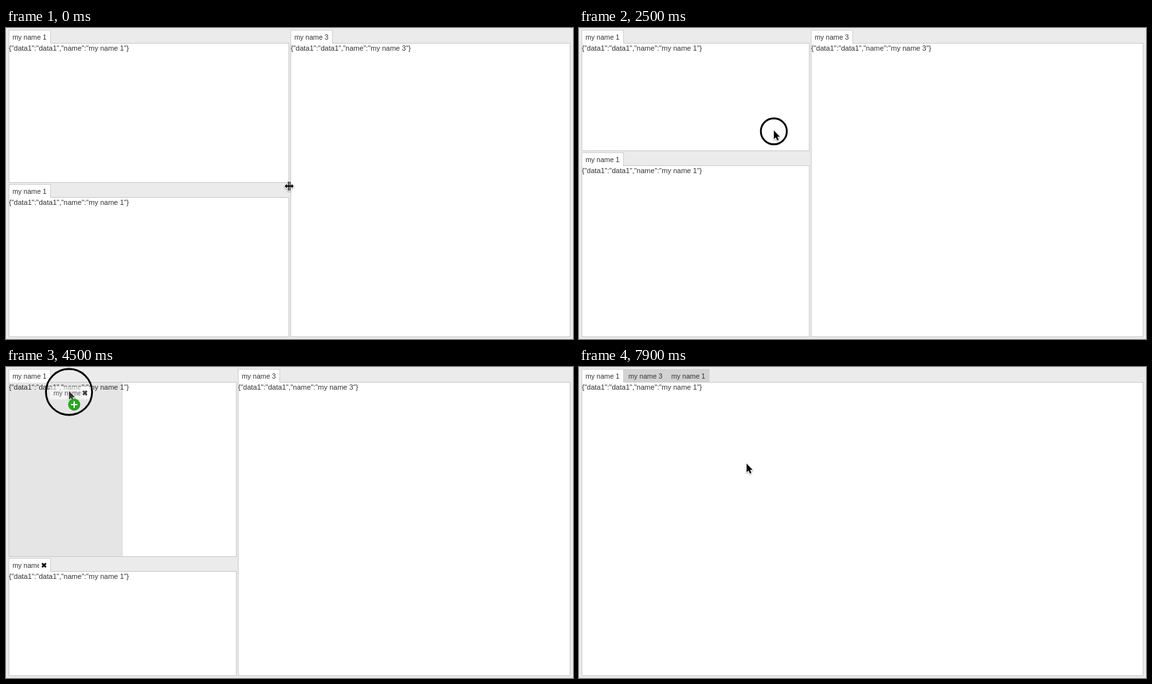
Animation of 873x480 px, one loop 8000 ms. Source, as an HTML page with a canvas:

```html
<!DOCTYPE html>
<html lang="en">
<head>
<meta charset="utf-8">
<title>Dockable panels</title>
<style>
html, body { margin: 0; width: 100%; height: 100%; overflow: hidden; background: #ebebeb; }
canvas { display: block; }
</style>
</head>
<body>
<canvas id="stage" width="873" height="480"></canvas>
<script>
const ctx = document.getElementById('stage').getContext('2d');
const LOOP = 8000, STEP = 100, LAG = 160;
const FONT = '"Liberation Sans", Arial, sans-serif';
const LEFT = 4, RIGHT = 868, TOP = 3, BOTTOM = 476, MIDDLE = 435;
const TAB = 66, HEAD = 20, GAP = 3;

// Pointer moves: start, end, x, y. It rests in between.
const moves = [
  [200, 1000, 557, 247], [1000, 1306, 355, 248],
  [1700, 2000, 300, 240], [2100, 2600, 300, 137], [2650, 3250, 300, 294],
  [3500, 3800, 36, 310], [4200, 4500, 97, 37], [4600, 4800, 97, 14],
  [5500, 5900, 300, 88], [5900, 6300, 476, 9],
  [6500, 7000, 97, 14], [7300, 7900, 258, 149]
];
const drags = [
  { from: 200, to: 1400 }, { from: 2100, to: 3450 },
  { from: 4180, to: 5000, tab: 1 }, { from: 6500, to: 7050, tab: 3 }
];

function pointerAt(t) {
  let x = 436, y = 244;
  for (const [start, end, toX, toY] of moves) {
    const k = Math.max(0, Math.min(1, (t - start) / (end - start)));
    x += (toX - x) * k;
    y += (toY - y) * k;
  }
  return { x: Math.round(x), y: Math.round(y) };
}

function text(s, x, y, size) {
  ctx.font = `${size}px ${FONT}`;
  ctx.fillStyle = '#333';
  ctx.fillText(s, x, y);
}

function rect(x, y, w, h, fill) {
  ctx.fillStyle = fill;
  ctx.fillRect(x, y, w, h);
}

function box(l, t, r, b, line) {
  rect(l, t, r - l + 1, b - t + 1, '#fff');
  ctx.strokeStyle = line;
  ctx.lineWidth = 1;
  ctx.strokeRect(l + .5, t + .5, r - l, b - t);
}

function label(n, x, y, hover, fill) {
  text('my name ' + n, x + 6, y + 14.5, 10.6);
  if (!hover) return;
  rect(x + 47, y + 2, 16, 17, fill);
  ctx.strokeStyle = '#111';
  ctx.lineWidth = 2.7;
  ctx.beginPath();
  ctx.moveTo(x + 51.5, y + 8); ctx.lineTo(x + 57.5, y + 14);
  ctx.moveTo(x + 57.5, y + 8); ctx.lineTo(x + 51.5, y + 14);
  ctx.stroke();
}

function panel(l, t, r, b, names, focus) {
  box(l, t + HEAD, r, b, '#c9c9c9');
  names.forEach((n, i) => {
    const x = l + TAB * i, fill = i ? '#d3d3d3' : '#fff';
    if (i) rect(x - 1, t, TAB, HEAD, fill);
    else {
      box(x, t, x + 64, t + HEAD, '#d0d0d0');
      rect(x + 1, t + HEAD - 1, 63, 3, fill);
    }
    const hover = focus.x >= x && focus.x < x + TAB && focus.y >= t && focus.y < t + HEAD;
    label(n, x, t, hover, fill);
  });
  text(`{"data1":"data1","name":"my name ${names[0]}"}`, l + .5, t + 31.5, 11);
}

function ghost(n, x, y) {
  rect(x - 30, y - 7, 65, 20, 'rgba(255,255,255,.6)');
  ctx.globalAlpha = .8;
  label(n, x - 30, y - 8, true, 'rgba(255,255,255,.6)');
  ctx.globalAlpha = 1;
}

function badge(x, y) {
  ctx.fillStyle = '#2aa522';
  ctx.beginPath();
  ctx.arc(x, y, 9.3, 0, 7);
  ctx.fill();
  rect(x - 5, y - 1, 10, 2, '#fff');
  rect(x - 1, y - 5, 2, 10, '#fff');
}

const arrow = new Path2D('M0 0V13.5L3 10.7L5.2 15.5L7.5 14.5L5.3 9.8H9.3Z');
const resize = new Path2D('M-7 0L-3.5-3.5V-1H-2V-7H-.6V-1H.6V-7H2V-1H3.5V-3.5L7 0L3.5 3.5V1H2V7H.6V1H-.6V7H-2V1H-3.5V3.5Z');

function cursor(x, y, shape) {
  const path = shape === 'arrow' ? arrow : resize;
  ctx.save();
  ctx.translate(x, y);
  if (shape === 'row') ctx.rotate(Math.PI / 2);
  ctx.lineJoin = 'round';
  ctx.strokeStyle = '#fff';
  ctx.lineWidth = 2;
  ctx.shadowColor = 'rgba(0,0,0,.35)';
  ctx.shadowBlur = 2;
  ctx.shadowOffsetY = 1;
  ctx.stroke(path);
  ctx.shadowColor = 'transparent';
  ctx.fillStyle = '#000';
  ctx.fill(path);
  ctx.restore();
}

function ring(x, y, r) {
  ctx.strokeStyle = '#000';
  ctx.lineWidth = 2.8;
  ctx.beginPath();
  ctx.arc(x, y, r, 0, 7);
  ctx.stroke();
}

function draw(t) {
  const { x, y } = pointerAt(t);
  const drag = drags.find(d => t >= d.from && t < d.to);
  const focus = drag ? pointerAt(drag.from) : { x, y };
  const [, rowDrag, tabDrop, lastDrop] = drags;
  let split = MIDDLE, shape = 'arrow';
  rect(0, 0, 873, 480, '#ebebeb');

  if (t < tabDrop.to) {
    split = Math.max(354, x - 1);
    // The lower splitter trails the pointer slightly.
    const row = t < rowDrag.from ? 238 : pointerAt(Math.min(t, rowDrag.to) - LAG).y - 2;
    panel(LEFT, TOP, t < 1700 ? split : split = 354, row, [1], focus);
    panel(split + GAP, TOP, RIGHT, BOTTOM, [3], focus);
    panel(LEFT, row + GAP, split, BOTTOM, [1], focus);
    if (drag && drag.tab && y > TOP + HEAD && y < row) {
      rect(LEFT + 1, TOP + HEAD + 1, 175, row - TOP - HEAD - 1, 'rgba(0,0,0,.1)');
    }
    if (Math.abs(x - split - 1) < 4) shape = 'col';
    else if (Math.abs(y - row - 2) < 4) shape = 'row';
  } else if (t < lastDrop.to) {
    panel(LEFT, TOP, MIDDLE, BOTTOM, [1, 1], focus);
    panel(MIDDLE + GAP, TOP, RIGHT, BOTTOM, [3], focus);
  } else {
    panel(LEFT, TOP, RIGHT, BOTTOM, [1, 3, 1], focus);
  }

  const tab = drag && drag.tab;
  if (tab) ghost(tab, x, y);
  ctx.globalAlpha = tab ? .75 : 1;
  cursor(x, y, shape);
  ctx.globalAlpha = 1;
  if (tab) badge(x + 8, y + 21);
  if (drag) {
    const radius = tab ? Math.min(35.5, 20 + (t - drag.from) * .08) : 20;
    ring(x, y + (shape === 'arrow' ? 1.5 : 0), radius);
  }
}

function tick(now) {
  draw(Math.floor(now % LOOP / STEP) * STEP);
  requestAnimationFrame(tick);
}
draw(0);
requestAnimationFrame(tick);
</script>
</body>
</html>
```
